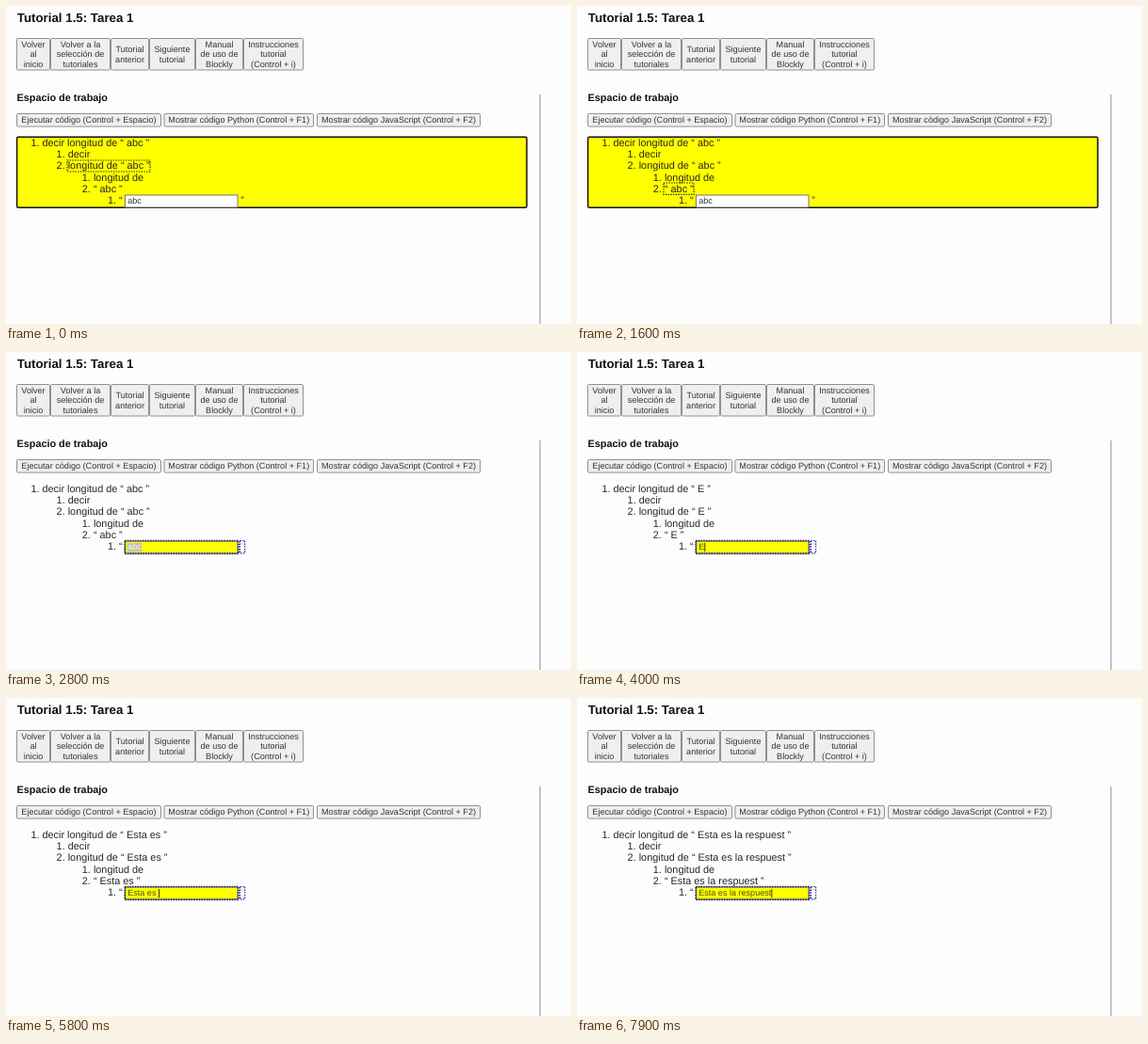
An HTML page that plays this animation: 600 px wide and 338 px high, repeating every 8 s.

```html
<!DOCTYPE html>
<html lang="es">
<head>
<meta charset="utf-8">
<title>Tutorial</title>
<style>
  html, body { margin: 0; width: 100%; height: 100%; overflow: hidden; background: #fdfdfd; }
  svg { display: block; width: 100vw; height: 100vh; }
  text { font-family: "Liberation Sans", Arial, sans-serif; text-rendering: geometricPrecision; fill: #262626; }
  .title { font-size: 13.3px; font-weight: bold; fill: #111; }
  .head { font-size: 10.85px; font-weight: bold; fill: #111; }
  .btn { font-size: 9.1px; text-anchor: middle; fill: #333; }
  .item { font-size: 10.88px; }
  .mark { font-size: 10.88px; text-anchor: end; }
  .field { font-size: 9.07px; white-space: pre; }
  .dots { fill: none; stroke-dasharray: 1.4 1.3; }
</style>
</head>
<body>
<svg id="stage" viewBox="0 0 600 338"></svg>
<script>
const LOOP = 8000, EDIT = 2800;
const stage = document.getElementById('stage');

function add(tag, attrs, content) {
  const el = document.createElementNS('http://www.w3.org/2000/svg', tag);
  for (const key in attrs) el.setAttribute(key, attrs[key]);
  if (content !== undefined) el.textContent = content;
  return stage.appendChild(el);
}
const text = (cls, x, y, content) => add('text', { class: cls, x, y }, content);
const rect = (x, y, right, bottom, attrs) =>
  add('rect', { x, y, width: right - x, height: bottom - y, ...attrs });
const show = (el, on) => el.setAttribute('visibility', on ? 'visible' : 'hidden');

function button(left, right, top, bottom, label) {
  rect(left + .5, top + .5, right - .5, bottom - .5,
    { rx: 1.2, fill: '#efefef', stroke: '#858585', 'stroke-width': .9 });
  const lines = label.split('|');
  const mid = (top + bottom) / 2 + 3.1;
  lines.forEach((line, i) =>
    text('btn', (left + right) / 2, mid + (i - (lines.length - 1) / 2) * 10.3, line));
}

text('title', 11.8, 17.2, 'Tutorial 1.5: Tarea 1');
text('head', 11.5, 100.6, 'Espacio de trabajo');
rect(566.3, 94, 567.7, 338, { fill: '#a9adb3' });

const edges = [11, 47, 111, 152, 201, 252, 316];
['Volver|al|inicio', 'Volver a la|selección de|tutoriales', 'Tutorial|anterior',
 'Siguiente|tutorial', 'Manual|de uso de|Blockly', 'Instrucciones|tutorial|(Control + i)']
  .forEach((label, i) => button(edges[i], edges[i + 1], 34, 68.5, label));
button(11, 165, 114, 128.6, 'Ejecutar código (Control + Espacio)');
button(167.5, 327, 114, 128.6, 'Mostrar código Python (Control + F1)');
button(330, 504, 114, 128.6, 'Mostrar código JavaScript (Control + F2)');

const panel = rect(11.6, 139.2, 553, 214.3,
  { rx: 1.5, fill: '#ff0', stroke: '#111', 'stroke-width': 1.5 });

// Nested list: number, depth, text around the edited value
const rows = [
  [1, 0, v => `decir longitud de “ ${v} ”`],
  [1, 1, () => 'decir'],
  [2, 1, v => `longitud de “ ${v} ”`],
  [1, 2, () => 'longitud de'],
  [2, 2, v => `“ ${v} ”`],
  [1, 3, () => '“']
].map(([num, depth, label], i) => {
  const x = 38.5 + depth * 27.2, y = 148.9 + i * 12.27;
  text('mark', x - 3, y, num + '.');
  return { el: text('item', x, y, ''), label };
});
const endQuote = text('item', 249.3, 210.2, '”');

const box = rect(126.5, 201, 246, 214, { 'stroke-width': 1 });
const selection = rect(129, 203, 144, 212.3, { fill: '#c3c3b4' });
const field = text('field', 129.2, 210.4, '');
const caret = rect(0, 203, .9, 212.3, { fill: '#222' });

// Keyboard focus, in order: start time and boxes
const dots = (...r) => rect(...r, { class: 'dots', stroke: '#222', 'stroke-width': 1.2 });
const focus = [
  [0, [dots(65, 164, 153, 176)]],
  [800, [dots(92, 176.2, 147, 188)]],
  [1500, [dots(92, 188, 124, 200.3)]],
  [2200, [dots(126.2, 200.5, 247, 214.3), dots(248.5, 200.5, 253.6, 213.8)]]
];

const typed = 'Esta es la respuest';
const keys = [4000, 4400, 4700, 5100, 5300, 5500, 5600, 5800, 6000, 6200,
  6400, 6500, 6700, 7200, 7300, 7500, 7600, 7800, 7900];

const pen = document.createElement('canvas').getContext('2d');
pen.font = '90.7px "Liberation Sans", Arial, sans-serif';

function draw(t) {
  const editing = t >= EDIT;
  const count = keys.filter(k => k <= t).length;
  const value = count ? typed.slice(0, count) : 'abc';

  show(panel, !editing);
  rows.forEach(row => { row.el.textContent = row.label(value); });
  endQuote.setAttribute('fill-opacity', editing ? .2 : 1);

  box.setAttribute('fill', editing ? '#ff0' : '#fff');
  box.setAttribute('stroke', editing ? '#55552a' : '#777');
  field.textContent = value;
  field.style.fill = !editing ? '#333' : count ? '#4d4d20' : '#f6f6f6';
  show(selection, editing && !count);
  show(caret, count);
  caret.setAttribute('x', 129.3 + pen.measureText(value).width / 10);

  const active = focus.filter(f => f[0] <= t).length - 1;
  focus.forEach(([, boxes], i) => boxes.forEach((b, part) => {
    show(b, i === active);
    b.style.stroke = editing ? '#1a1a9c' : '#222';
    b.style.strokeWidth = editing && part === 0 ? 1.7 : 1.2;
  }));
}

const start = performance.now();
function tick() {
  draw((performance.now() - start) % LOOP);
  requestAnimationFrame(tick);
}
tick();
</script>
</body>
</html>
```
